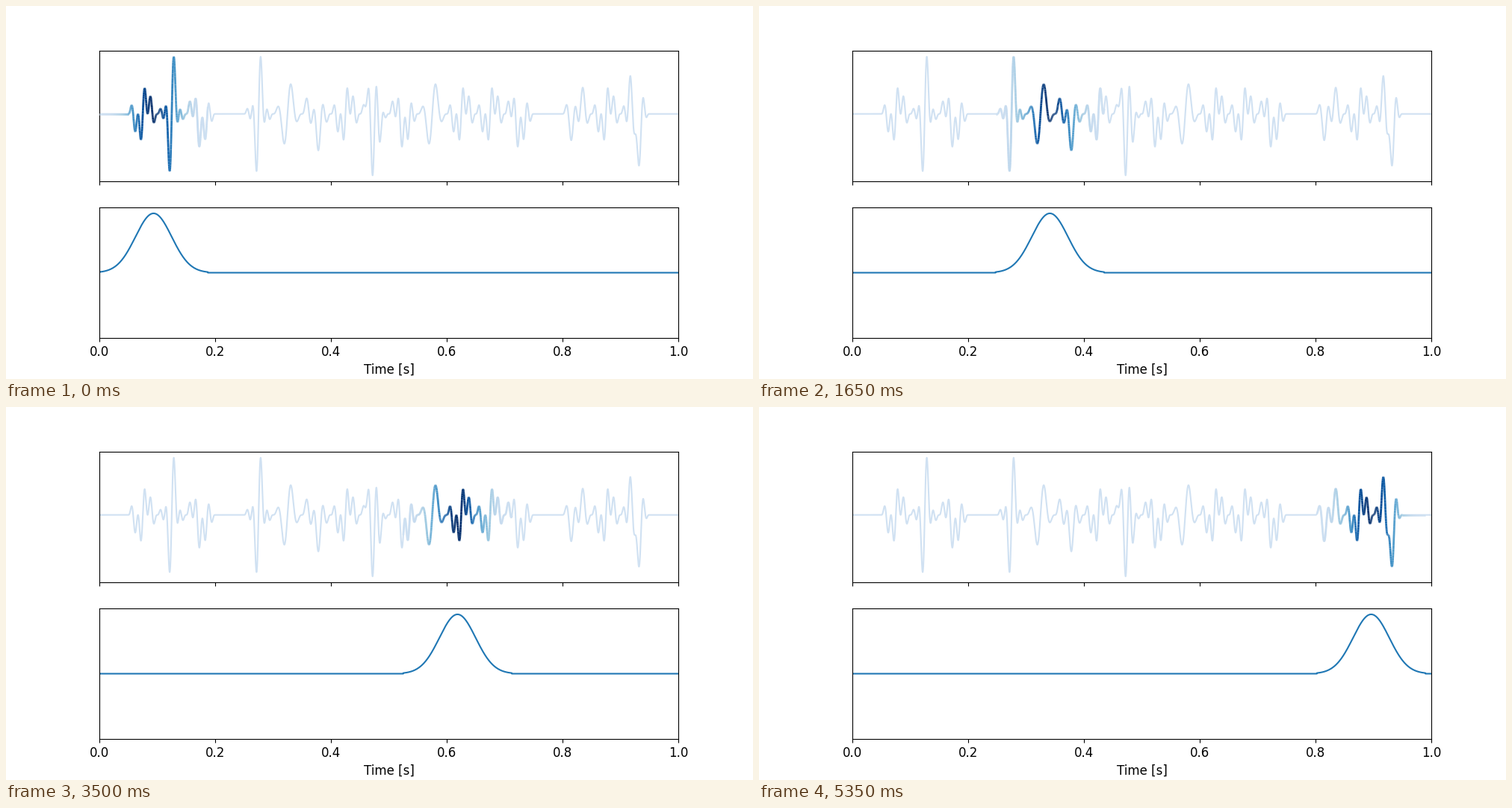
Write a matplotlib script that moves like this. It is 1000x500 px and loops after 5.4 s.

```python
import numpy as np
import matplotlib.pyplot as plt
from matplotlib.animation import FuncAnimation
from matplotlib.collections import LineCollection

N = 4000          # samples in one second
STEP = 30         # window hop per frame
WIDTH = 750       # window length
FRAMES = 108

t = np.arange(N) / N

# Each 50 ms slot is a chord of sine tones (in cycles per slot); "a" is the lowest.
CYCLES = {"a": 1.2, "b": 2, "c": 3, "d": 4}
SLOTS = ("- bcd bd abcd - bd b abc bcd abd "
         "abcd b bcd bcd abcd - bc bcd acd -").split()


def chord(notes):
    x = np.arange(N // len(SLOTS)) / (N // len(SLOTS))
    tone = sum(np.sin(2 * np.pi * CYCLES[n] * x) for n in notes if n in CYCLES)
    return np.sin(np.pi * x) ** 2 * tone


signal = np.concatenate([chord(s) for s in SLOTS])
bell = np.exp(-0.5 * ((np.arange(WIDTH) - (WIDTH - 1) / 2) / (WIDTH / 6)) ** 2)

points = np.column_stack([t, signal])
segments = np.stack([points[:-1], points[1:]], axis=1)

plt.rcParams["font.family"] = "DejaVu Sans"
plt.rcParams["font.size"] = 12
blues = plt.get_cmap("Blues")

fig, (top, low) = plt.subplots(2, 1, sharex=True, figsize=(10, 5), dpi=100)
top.plot(t, signal, color=blues(0.2), lw=1.5)
glow = LineCollection([], linewidths=2, zorder=3)
glow.set_color(blues(0.2 + 0.8 * bell))
top.add_collection(glow, autolim=False)

curve, = low.plot(t, np.zeros(N), color="C0", lw=1.5)
low.set_ylim(-1.1, 1.1)
low.set_xlim(0, 1)
low.set_xlabel("Time [s]")
for ax in (top, low):
    ax.set_yticks([])


def update(i):
    start = i * STEP
    window = np.zeros(N)
    window[start:start + WIDTH] = bell
    curve.set_ydata(window)
    glow.set_segments(segments[start:start + WIDTH])
    return glow, curve


anim = FuncAnimation(fig, update, frames=FRAMES, interval=50,
                     repeat=True, repeat_delay=0, blit=False)
plt.show()
```
